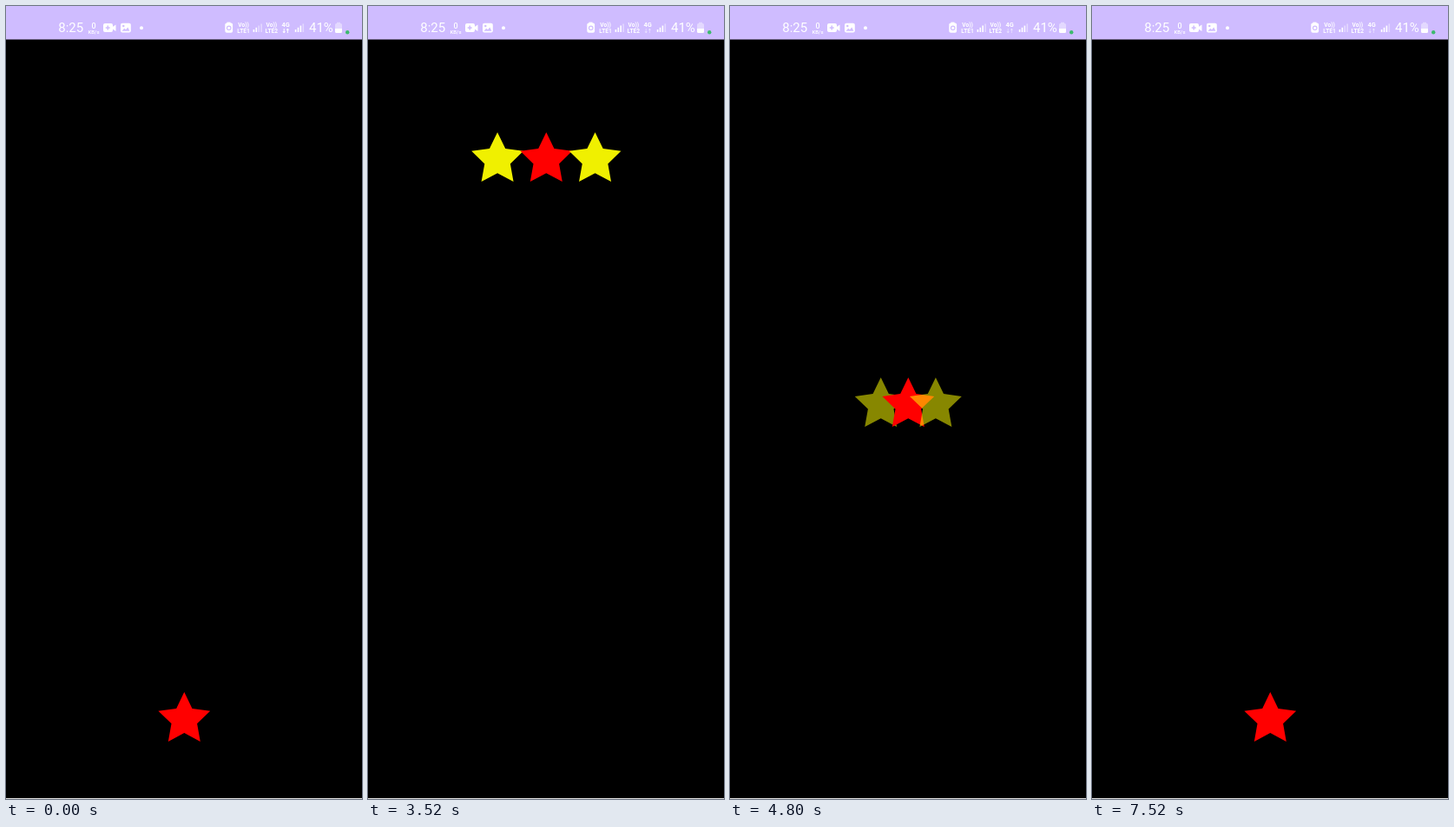
Animation of 410x912 px, one loop 7.68 s. Source, as an HTML page with a canvas:

```html
<!DOCTYPE html>
<html lang="en">
<head>
<meta charset="utf-8">
<title>Star burst</title>
<style>
  html, body { margin: 0; width: 100%; height: 100%; overflow: hidden; background: #000; }
  canvas { display: block; width: 410px; height: 912px; }
</style>
</head>
<body>
<canvas id="stage" width="410" height="912"></canvas>
<script>
const ctx = document.getElementById('stage').getContext('2d');
const LOOP = 7680, STEP = 80;
const LILAC = '#cfbcff', WHITE = '#fff', DIM = 'rgba(255,255,255,.42)';

// Star geometry: box size, centre column, centre rows at both ends
const SIZE = 59.8, OUTER = SIZE * .5257, INNER = SIZE * .26;
const MID = 205.3, TOP = 135.7, BOTTOM = 820.5;

const linear = u => u;
const smooth = u => u * u * (3 - 2 * u);
const sineOut = u => Math.sin(u * Math.PI / 2);

// Share of a move that is done at time t
function part(t, from, to, ease) {
  return ease(Math.min(1, Math.max(0, (t - from) / (to - from))));
}

// Drag progress: 0 = bottom, 1 = top
function progress(t) {
  const up = .735 * part(t, 480, 880, smooth)
    + .123 * part(t, 880, 1280, linear)
    + .142 * part(t, 1280, 1520, sineOut);
  const down = .6 * part(t, 3457, 4450, sineOut)
    - .137 * part(t, 4450, 4863, smooth)
    + .537 * part(t, 4863, 5840, smooth);
  return Math.min(1, Math.max(0, up - down));
}

function drawStar(cx, cy, color, alpha) {
  ctx.globalAlpha = alpha;
  ctx.fillStyle = color;
  ctx.beginPath();
  for (let i = 0; i < 10; i++) {
    const r = i % 2 ? INNER : OUTER, a = i * Math.PI / 5;
    ctx.lineTo(cx + r * Math.sin(a), cy - r * Math.cos(a));
  }
  ctx.fill();
  ctx.globalAlpha = 1;
}

function rect(x, y, w, h, color, r = 0) {
  ctx.fillStyle = color;
  ctx.beginPath();
  ctx.roundRect(x, y, w, h, r);
  ctx.fill();
}

function disc(x, y, r, color) {
  ctx.fillStyle = color;
  ctx.beginPath();
  ctx.arc(x, y, r, 0, Math.PI * 2);
  ctx.fill();
}

function poly(color, ...p) {
  ctx.fillStyle = color;
  ctx.beginPath();
  for (let i = 0; i < p.length; i += 2) ctx.lineTo(p[i], p[i + 1]);
  ctx.fill();
}

function text(s, x, y, size, weight = 400, align = 'left') {
  ctx.font = `${weight} ${size}px Roboto, sans-serif`;
  ctx.textAlign = align;
  ctx.fillStyle = WHITE;
  ctx.fillText(s, x, y);
}

function bars(x, level) {
  for (let i = 0; i < 4; i++) {
    const h = 3 + i * 2.2;
    rect(x + i * 2.9, 30 - h, 1.6, h, i < level ? WHITE : DIM);
  }
}

function volte(x, n) {
  text('Vo))', x, 24, 6.6, 700, 'center');
  text('LTE' + n, x, 31, 6.6, 700, 'center');
}

function arrow(x, dir, color) {
  rect(x - .5, 26, 1, 5, color);
  const tip = 28.5 + dir * 2.8, base = tip - dir * 2;
  poly(color, x - 1.8, base, x + 1.8, base, x, tip);
}

function camera() {
  rect(112, 20, 11, 10, WHITE, 2);
  poly(WHITE, 122, 24.5, 126.5, 21.5, 126.5, 29, 122, 26);
  rect(114.7, 24.3, 5, 1.5, LILAC);
  rect(116.5, 22.5, 1.5, 5, LILAC);
}

function picture() {
  rect(132, 19.7, 11.8, 10.8, WHITE, 2);
  disc(135.3, 23, 1.2, LILAC);
  poly(LILAC, 133.5, 28.8, 136.2, 25.8, 138, 27.2, 140.3, 24.6, 142.4, 28.8);
}

function saver() {
  rect(254.5, 18.6, 4, 2, WHITE);
  rect(252.3, 19.6, 8.8, 11.2, WHITE, 2);
  disc(256.7, 25.3, 2.8, LILAC);
  disc(256.7, 25.3, 1.6, WHITE);
}

function battery() {
  rect(381, 18.8, 4, 1.2, DIM);
  rect(379, 20, 8, 6, DIM, [1.5, 1.5, 0, 0]);
  rect(379, 26, 8, 5, WHITE, [0, 0, 1.5, 1.5]);
}

function statusBar(t) {
  const traffic = t < 640 ? WHITE : DIM;
  const level = t >= 640 && t < 7520 ? 3 : 2;
  rect(0, 0, 410, 38.6, LILAC);

  text('8:25', 60.3, 30.2, 15);
  text('0', 101, 25.6, 9, 500, 'center');
  text('KB/s', 101, 31.6, 6, 500, 'center');
  camera();
  picture();
  disc(156, 25.2, 2, WHITE);

  saver();
  volte(273.6, 1);
  bars(284.6, level);
  volte(305.8, 2);
  text('4G', 322.2, 24.3, 7.4, 700, 'center');
  arrow(320.2, 1, traffic);
  arrow(324.4, -1, traffic);
  bars(332.8, 3);
  text('41%', 349, 30.2, 15);
  battery();
  disc(393.2, 30.2, 2.2, '#3dba6f');
}

function draw(t) {
  const p = progress(t), y = BOTTOM + (TOP - BOTTOM) * p;
  rect(0, 0, 410, 912, '#000');
  rect(0, 911, 410, 1, '#e0e0e0');
  statusBar(t);
  drawStar(MID - SIZE * p, y, '#ff0', p);
  drawStar(MID, y, '#f00', 1);
  drawStar(MID + SIZE * p, y, '#ff0', p);
}

const start = performance.now();
function frame() {
  const t = (performance.now() - start) % LOOP;
  draw(Math.floor(t / STEP) * STEP);
  requestAnimationFrame(frame);
}
frame();
</script>
</body>
</html>
```
